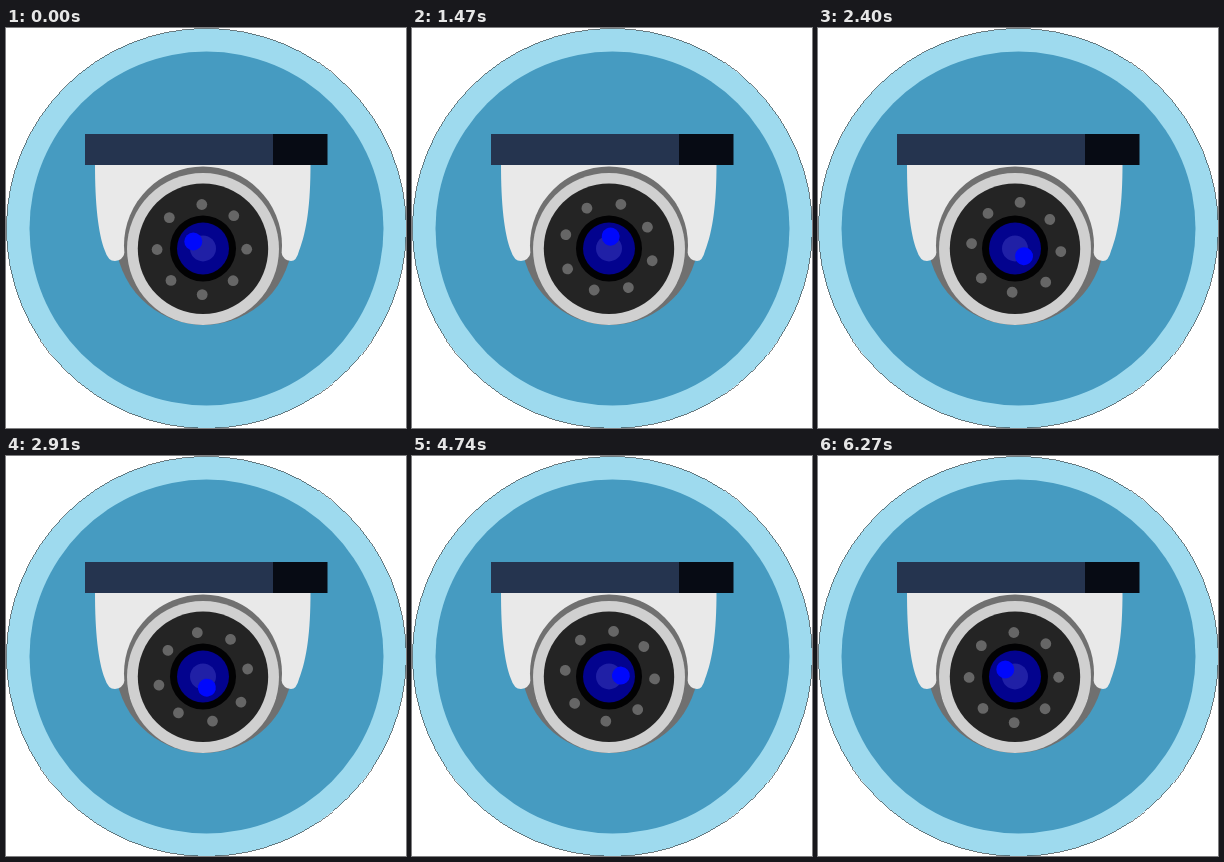
An HTML page for the animation above (6300 ms loop, 400 by 400 pixels).

```html
<!DOCTYPE html>
<html lang="en">
<head>
<meta charset="utf-8">
<title>Dome camera</title>
<style>
  html, body { margin: 0; width: 100%; height: 100%; overflow: hidden; background: #fff; }
  svg { display: block; width: 100%; height: 100%; }
</style>
</head>
<body>
<svg viewBox="0 0 400 400">
  <circle cx="200.4" cy="200.4" r="200" fill="#9edaee"/>
  <circle cx="200.4" cy="200.4" r="200" fill="none" stroke="#111" stroke-width=".5" shape-rendering="crispEdges"/>
  <circle cx="200.5" cy="200.5" r="177" fill="#469bc1"/>

  <!-- housing -->
  <circle cx="198" cy="208.5" r="88.5" fill="#707070"/>
  <path fill="#e9e9e9" d="M89 136C89 175 92 205 99 223Q102 233 109 233Q117 232 118.5 225H275.5Q277 232 285 233Q290.500 233 293 223C301 203 304.500 175 304.500 136Z"/>
  <circle cx="197" cy="217.5" r="79" fill="#707070"/>
  <path fill="#25344f" d="M79 106H267V137H79Z"/>
  <path fill="#070b14" d="M267 106H321.500V137H267Z"/>

  <!-- lens -->
  <circle cx="197" cy="221" r="76" fill="#d0d0d0"/>
  <circle cx="197" cy="220.7" r="65.2" fill="#242424"/>
  <circle cx="197" cy="220.4" r="33" fill="#020203"/>
  <circle cx="197" cy="220.4" r="26" fill="#03038e"/>
  <circle cx="197" cy="220.4" r="13" fill="#2020a6"/>
  <g id="rotor">
    <g id="leds" fill="#666"></g>
    <circle cx="-9.7" cy="-6.9" r="9" fill="#0008fc"/>
  </g>
</svg>
<script>
  const HOLD = 450, MOVE = 2700, SWING = 219;
  const rotor = document.getElementById('rotor');
  const leds = document.getElementById('leds');

  // LED centres relative to the pivot, slightly uneven
  const spots = [
    [-1.2, -43.9], [30.8, -32.7], [43.7, 0.8], [30.1, 32.3],
    [-0.8, 46.2], [-32, 32], [-45.9, 1.1], [-33.7, -30.8]
  ];
  for (const [x, y] of spots) {
    const led = document.createElementNS('http://www.w3.org/2000/svg', 'circle');
    led.setAttribute('cx', x);
    led.setAttribute('cy', y);
    led.setAttribute('r', 5.4);
    leds.append(led);
  }

  const ease = p => p < 0.5 ? 2 * p * p : 1 - 2 * (1 - p) ** 2;

  function draw(now) {
    const half = HOLD + MOVE;
    const t = now % (2 * half);
    const turn = ease(Math.max(0, t % half - HOLD) / MOVE);
    const angle = SWING * (t < half ? turn : 1 - turn);
    rotor.setAttribute('transform', `translate(197 220.4) rotate(${angle})`);
    requestAnimationFrame(draw);
  }
  draw(performance.now());
</script>
</body>
</html>
```
